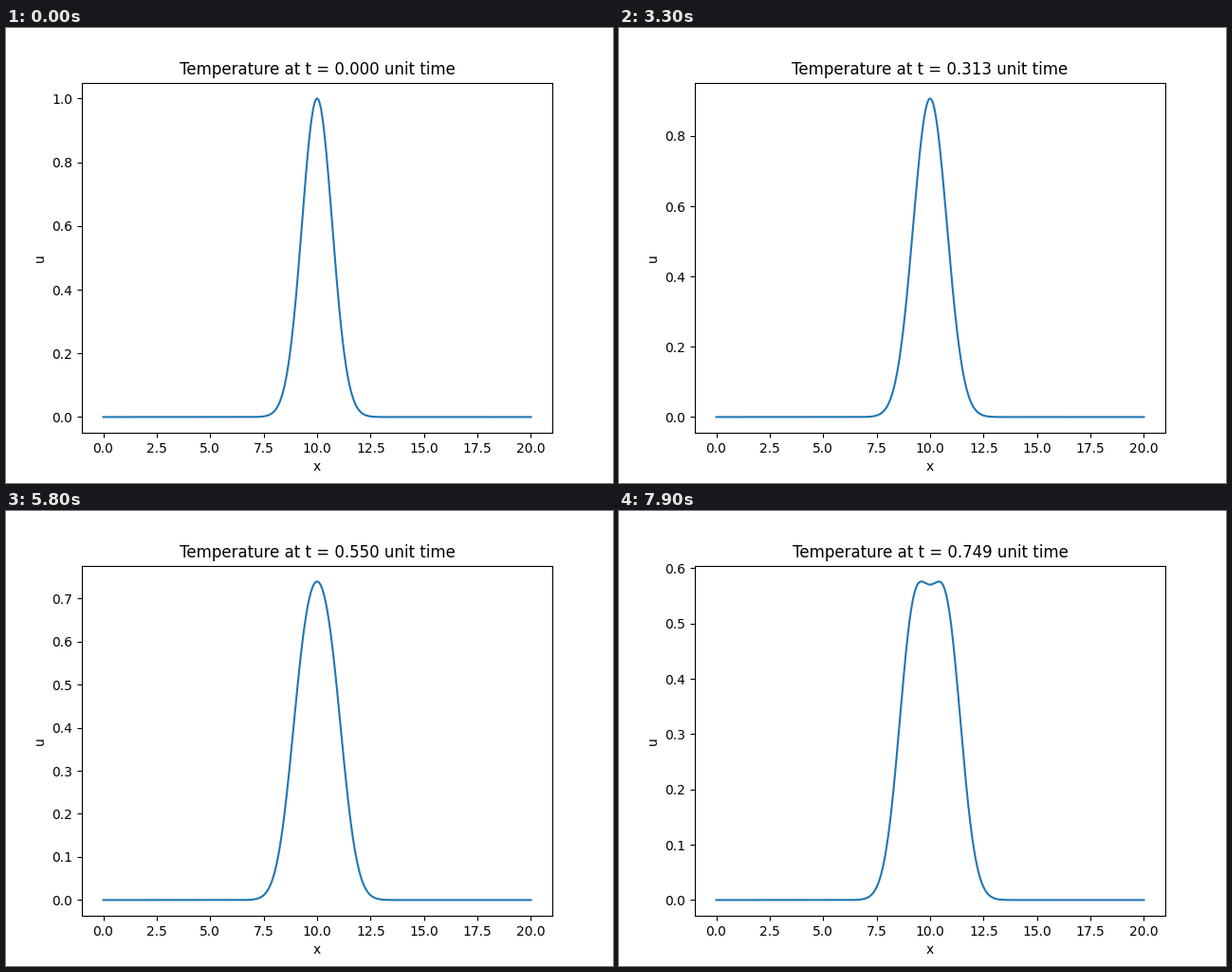
A matplotlib script for the animation above (8000 ms loop, 640x480 px).

```python
import numpy as np
import matplotlib.pyplot as plt
from matplotlib.animation import FuncAnimation

FRAMES = 80
INTERVAL = 100      # ms
DT = 0.009482       # model time per frame
CENTER = 10.0

x = np.linspace(0, 20, 1001)


def pulse(s):
    return np.exp(-(s - CENTER) ** 2)


def wave(t):
    """Initial pulse split into two halves travelling at unit speed."""
    return 0.5 * (pulse(x - t) + pulse(x + t))


fig, ax = plt.subplots(figsize=(6.4, 4.8), dpi=100)
line, = ax.plot(x, wave(0), color="#1f77b4", lw=1.5)
ax.set_xlabel("x")
ax.set_ylabel("u")
title = ax.set_title("")


def update(i):
    t = i * DT
    line.set_ydata(wave(t))
    title.set_text(f"Temperature at t = {t:.3f} unit time")
    ax.relim()
    ax.autoscale_view()
    return line, title


anim = FuncAnimation(fig, update, frames=FRAMES, interval=INTERVAL,
                     init_func=lambda: update(0), repeat=True, blit=False)
plt.show()
```
